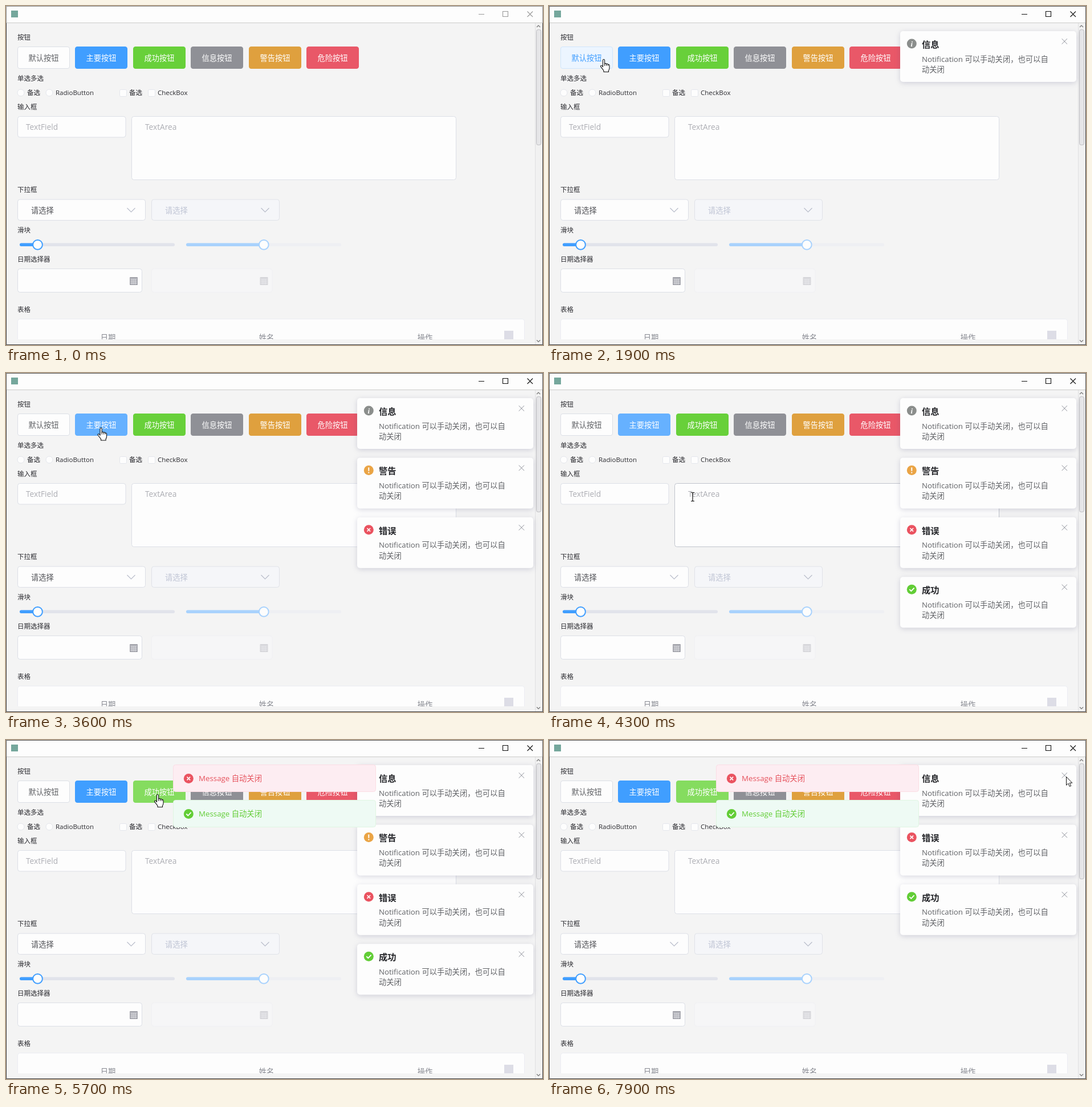
Write an HTML page that moves like this. It is 942 px wide and 594 px high and loops after 8000 ms.

```html
<!DOCTYPE html>
<html lang="zh-CN">
<head>
<meta charset="utf-8">
<title>组件演示</title>
<style>
html, body { margin: 0; width: 100%; height: 100%; overflow: hidden; background: #f4f4f4; }
svg { display: block; width: 942px; height: 594px; }
text { font: 13.3px "Open Sans", "Noto Sans CJK SC", "Noto Sans CJK", sans-serif; }
.small { font-size: 11.5px; fill: #2b2b30; }
.hint { font-size: 13.7px; fill: #adaeb4; }
.title { font-size: 15.3px; font-weight: 700; fill: #25262a; }
.card { filter: drop-shadow(0 2px 5px rgba(60, 60, 110, .2)); }
</style>
</head>
<body>
<svg id="stage" viewBox="0 0 942 594" xmlns="http://www.w3.org/2000/svg"></svg>
<script>
const LOOP = 8000, STEP = 100;
const WHITE = '#fdfdfd', EDGE = '#dcdfe6', BLUE = '#409eff';
const stage = document.getElementById('stage');
const $ = id => document.getElementById(id);

// Drawing helpers
const rect = (x, y, w, h, fill, stroke = 'none', r = 0, extra = '') =>
  `<rect x="${x}" y="${y}" width="${w}" height="${h}" rx="${r}" fill="${fill}" stroke="${stroke}" ${extra}/>`;
const box = (x, y, w, h, fill = WHITE, stroke = EDGE, extra = '') =>
  rect(x + .5, y + .5, w - 1, h - 1, fill, stroke, 4, extra);
const circle = (x, y, r, fill, stroke = 'none', width = 1) =>
  `<circle cx="${x}" cy="${y}" r="${r}" fill="${fill}" stroke="${stroke}" stroke-width="${width}"/>`;
const line = (d, stroke, width = 1, extra = '') =>
  `<path d="${d}" fill="none" stroke="${stroke}" stroke-width="${width}" ${extra}/>`;
const text = (x, y, str, fill = '#606266', extra = '') =>
  `<text x="${x}" y="${y}" fill="${fill}" ${extra}>${str}</text>`;
const label = (x, middle, str) => text(x, middle + 4.3, str, '', 'class="small"');
const cross = (x, y, r, color, width = 1) =>
  line(`M${x - r} ${y - r}l${2 * r} ${2 * r}m0 ${-2 * r}l${-2 * r} ${2 * r}`, color, width);

const BUTTONS = [
  ['默认按钮', WHITE, '#ecf5ff'], ['主要按钮', BLUE, '#66b1ff'], ['成功按钮', '#68d03a', '#85dc5f'],
  ['信息按钮', '#8f9096', '#a6a9ad'], ['警告按钮', '#dfa03e', '#ebb563'], ['危险按钮', '#e95868', '#f78989']
];
const buttonX = i => Math.floor(20 + 101.5 * i);
const button = ([name, fill], i) => `<g id="button${i}">` +
  rect(buttonX(i) + .5, 71.5, 91, 38, fill, i ? fill : EDGE, 3.5) +
  text(buttonX(i) + 46, 96, name, i ? '#fff' : '#606266', 'text-anchor="middle"') + '</g>';

const combo = (x, fill, color, edge) => box(x, 338.5, 225, 37.5, fill, edge) +
  text(x + 24, 363, '请选择', color) + line(`M${x + 192.5} 354l7 7l7-7`, '#b9bdca', 1.2);

const slider = (x, at, color, track) => rect(x, 415.5, 272, 5.5, track, 'none', 2.7) +
  rect(x, 415.5, at - x, 5.5, color, 'none', 2.7) + circle(at, 418.3, 8.4, WHITE, color, 2);

const calendar = (x, color) => rect(x, 475, 14, 14, color, 'none', 1) +
  line(`M${x + 1} 478.5h12M${x + 1} 482h12M${x + 1} 485.5h12M${x + 4} 478v10M${x + 7} 478v10M${x + 10} 478v10`, '#ededf0', .8);

const ICONS = {
  info: ['#8b8e8c', (x, y) => `<text x="${x}" y="${y + 4.5}" text-anchor="middle" fill="#fff" style="font:italic 700 13px 'Liberation Serif',serif">i</text>`],
  warning: ['#eaa445', (x, y) => line(`M${x} ${y - 5}v6.3m0 1.7v2`, '#fff', 2)],
  error: ['#ea5360', (x, y) => cross(x, y, 2.8, '#fff', 1.7)],
  success: ['#62cd36', (x, y) => line(`M${x - 4} ${y}l3 3l5.3-5.6`, '#fff', 1.8)]
};
const icon = (kind, x, y) => circle(x, y, 8.5, ICONS[kind][0]) + ICONS[kind][1](x, y);

const CARDS = [
  { kind: 'info', title: '信息', start: 1400 },
  { kind: 'warning', title: '警告', start: 1900, end: 6100 },
  { kind: 'error', title: '错误', start: 3300 },
  { kind: 'success', title: '成功', start: 3700 }
];
const card = ({ kind, title }, i) => `<g id="card${i}">` +
  rect(616, 44, 309, 89, WHITE, 'none', 5, 'class="card"') + icon(kind, 636.3, 66) +
  text(654, 73, title, '', 'class="title"') +
  text(654, 97.7, 'Notification 可以手动关闭，也可以自') + text(654, 116, '动关闭') +
  cross(904.3, 62, 4.7, '#8e919a') + '</g>';

const MESSAGES = [
  { kind: 'error', fill: '#fdedf2', edge: '#fbdde4', color: '#e6535d', start: 5000 },
  { kind: 'success', fill: '#eefaf4', edge: '#e0f5e2', color: '#62cd36', start: 5400 }
];
const message = (m, i) => `<g id="message${i}">` + box(293, 43, 356, 48, m.fill, m.edge) +
  icon(m.kind, 320.3, 67.5) + text(338, 72.3, 'Message 自动关闭', m.color) + '</g>';

const CURSORS = {
  arrow: '<path d="M.5 .5V15.2L3.9 12L6.2 17.4L8.6 16.4L6.3 11.2H10.8Z" fill="#fff" stroke="#111"/>',
  hand: '<path d="M-1.5 13V1.3Q-1.5-.5 0-.5T1.6 1.3V7.2Q4 5.8 4.6 7.8Q7 6.5 7.5 8.7Q10 8 10 10.5V14.5Q10 17 8.5 19V21.5H0V19.2L-5.2 12.4Q-6 10.7-4.4 10.3T-1.5 13Z" fill="#fff" stroke="#111" stroke-width="1.1"/>' +
    line('M1.6 7v4M4.6 8v3M7.5 9v2', '#111'),
  beam: line('M-3-7.5h2.2L0-6.8L.8-7.5H3M0-7V7M-3 7.5h2.2L0 6.8L.8 7.5H3', '#111', 1.2)
};

stage.innerHTML =
  rect(0, 0, 942, 594, '#f4f4f4') + rect(0, 0, 942, 29, WHITE) +
  line('M0 29.5H942', '#cbcbc8') + rect(9, 8, 12, 12, '#75a79c') +
  '<g id="controls" fill="none" stroke-width="1.1"><path d="M829 14.5h10M871.5 9.5h9v9h-9zM914.5 9.5l9.5 9.5m0-9.5l-9.5 9.5"/></g>' +
  [['按钮', 55], ['单选多选', 126.3], ['输入框', 176.3], ['下拉框', 322], ['滑块', 392.5], ['日期选择器', 444], ['表格', 531.5]]
    .map(([name, y]) => label(20, y, name)).join('') +
  BUTTONS.map(button).join('') +
  circle(26, 152, 6, WHITE, '#e4e6ec') + label(37, 152, '备选') +
  circle(76, 152, 6, WHITE, '#e4e6ec') + label(87, 152, 'RadioButton') +
  rect(199.5, 146.5, 12, 12, WHITE, '#e4e6ec', 2) + label(216, 152, '备选') +
  rect(249.5, 146.5, 12, 12, WHITE, '#e4e6ec', 2) + label(266, 152, 'CheckBox') +
  box(20, 193, 190.5, 37.5) + text(35, 217, 'TextField', '', 'class="hint"') +
  box(220, 193, 570, 112, WHITE, EDGE, 'id="area"') + text(244, 217, 'TextArea', '', 'class="hint"') +
  combo(20, WHITE, '#505156', EDGE) + combo(255, '#f5f6f9', '#bfc4d4', '#e0e2e8') +
  slider(24, 55.5, BLUE, '#e1e3eb') + slider(316, 452.3, '#a8d2fd', '#eeeff3') +
  box(20, 460, 219, 42) + calendar(217, '#a4a5ac') +
  box(255, 460, 212.5, 42, '#f6f6f7', '#f0f0f3') + calendar(445.5, '#d6d6da') +
  '<clipPath id="view"><path d="M0 30H928V584H0z"/></clipPath><g clip-path="url(#view)">' +
  box(20, 548, 890, 60, WHITE, '#ebecf2') +
  [['日期', 179], ['姓名', 457], ['操作', 735]].map(([name, x]) => text(x, 586, name, '#85878f', 'text-anchor="middle"')).join('') +
  rect(874, 569, 16, 16, '#dddde6') + '</g>' +
  rect(928, 30, 13, 563, '#f1f1f1') + line('M928.5 30V593', '#dfdfe1') +
  rect(930.5, 41.5, 8, 202, '#e6e6e8', '#bcbcc0', 3) +
  line('M931 37l3-3l3 3M931 585.5l3 3l3-3', '#777', 1.2) +
  CARDS.map(card).join('') + MESSAGES.map(message).join('') +
  line('M.5 30V.5H941.5V30', '#777', 1, 'id="frame"') + line('M.5 30V593.5H941.5V30', '#3c3c3e') +
  Object.keys(CURSORS).map(k => `<g id="${k}">${CURSORS[k]}</g>`).join('');

// Pointer path: time, x, y
const PATH = [
  [500, 215, 400], [900, 98, 98], [1200, 96, 94], [2200, 96, 94], [2500, 100, 127], [2900, 165, 95],
  [3900, 167, 97], [4300, 252, 217], [4500, 260, 190], [4900, 266, 96], [5800, 266, 96],
  [6500, 499, 261], [7000, 760, 160], [7500, 904, 68], [7900, 907, 64]
];
const clamp = v => Math.max(0, Math.min(1, v));
const smooth = v => v * v * (3 - 2 * v);
const easeOut = v => 1 - (1 - v) ** 3;

function pointer(t) {
  const next = PATH.findIndex(p => p[0] > t);
  if (next < 0) return PATH[PATH.length - 1].slice(1);
  if (next === 0) return null;
  const [t0, x0, y0] = PATH[next - 1], [t1, x1, y1] = PATH[next];
  const k = smooth((t - t0) / (t1 - t0));
  return [x0 + (x1 - x0) * k, y0 + (y1 - y0) * k];
}
const inside = (p, x, y, w, h) => p && p[0] >= x && p[0] <= x + w && p[1] >= y && p[1] <= y + h;
const set = (id, attrs) => Object.entries(attrs).forEach(([k, v]) => $(id).setAttribute(k, v));
const show = (id, on) => { $(id).style.display = on ? '' : 'none'; };

function render(t) {
  const active = t >= CARDS[0].start, p = pointer(t);
  set('controls', { stroke: active ? '#111' : '#999' });
  set('frame', { stroke: active ? '#555' : '#8c8c8c' });

  const focus = t >= MESSAGES[0].start ? 2 : t >= CARDS[2].start ? 1 : active ? 0 : -1;
  let overButton = false;
  BUTTONS.forEach(([, fill, lit], i) => {
    const over = inside(p, buttonX(i), 71, 92, 39) && t < 5800;
    const on = over || i === focus;
    overButton = overButton || over;
    const [shape, caption] = $('button' + i).children;
    shape.setAttribute('fill', on ? lit : fill);
    shape.setAttribute('stroke', i ? (on ? lit : fill) : on ? '#d0e6fc' : EDGE);
    if (!i) caption.setAttribute('fill', on ? BLUE : '#606266');
  });

  const overArea = inside(p, 220, 193, 570, 112) && !(t > 3000 && p[0] > 616);
  const overField = inside(p, 20, 193, 190, 37);
  set('area', { stroke: overArea ? '#c0c4cc' : EDGE });

  const lift = easeOut(clamp((t - CARDS[1].end - 100) / 300));
  CARDS.forEach((c, i) => {
    const enter = easeOut(clamp((t - c.start) / 300));
    const leave = c.end ? smooth(clamp((t - c.end) / 300)) : 0;
    show('card' + i, enter > 0 && leave < 1);
    const slot = i > 1 ? i - lift : i;
    set('card' + i, { transform: `translate(${330 * (1 - enter + leave)} ${104.4 * slot})` });
  });
  MESSAGES.forEach((m, i) => {
    const enter = easeOut(clamp((t - m.start) / 300));
    show('message' + i, enter > 0);
    set('message' + i, { opacity: enter, transform: `translate(0 ${62 * i - 40 * (1 - enter)})` });
  });

  const kind = overButton ? 'hand' : overArea || overField ? 'beam' : 'arrow';
  Object.keys(CURSORS).forEach(k => show(k, p && k === kind));
  if (p) set(kind, { transform: `translate(${p[0]} ${p[1]})` });
}

const origin = performance.now();
function tick() {
  const t = (performance.now() - origin) % LOOP;
  render(Math.floor(t / STEP) * STEP);
  requestAnimationFrame(tick);
}
render(0);
requestAnimationFrame(tick);
</script>
</body>
</html>
```
